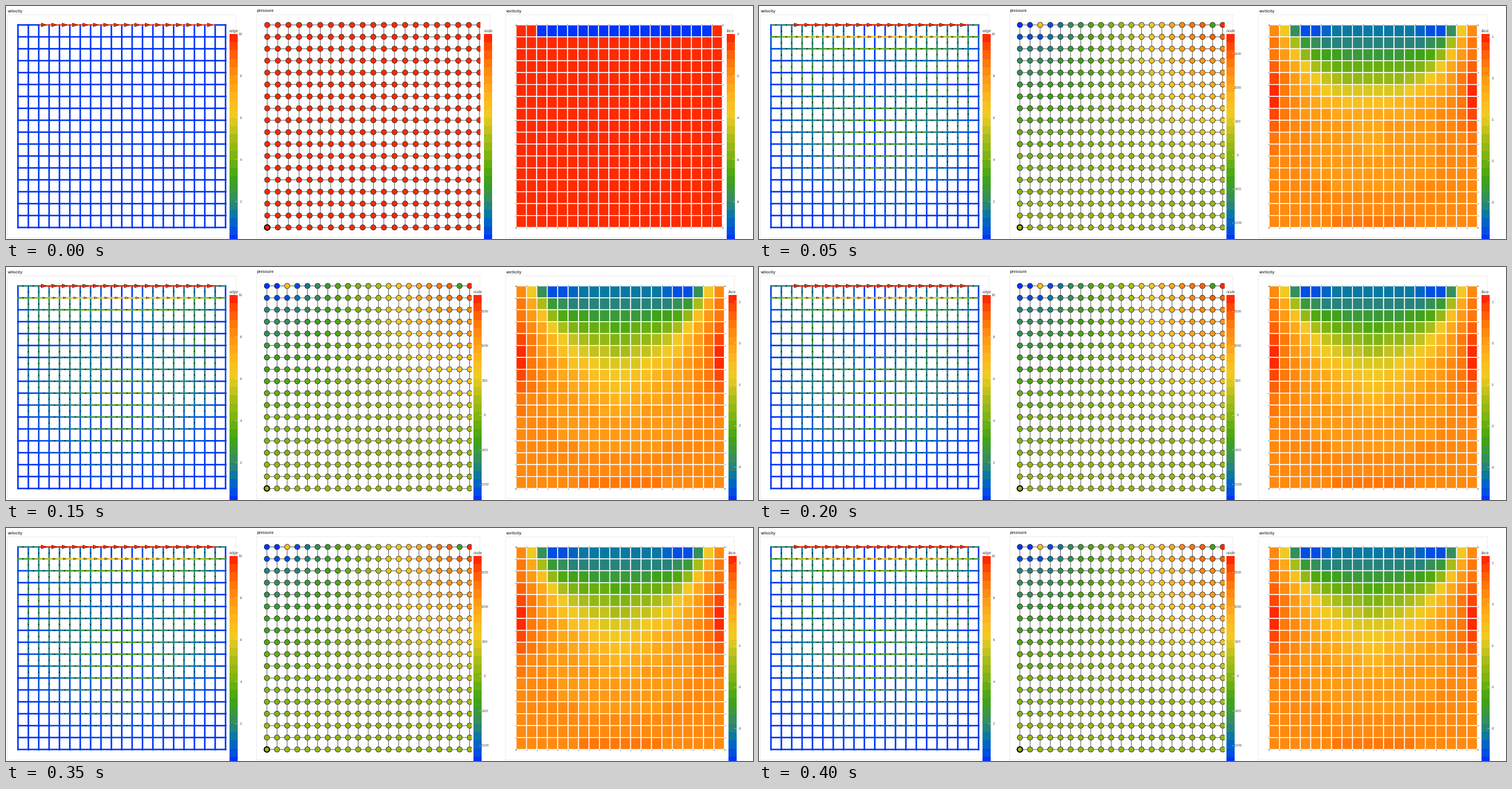
Animation of 1280 by 400 pixels, one loop 8 s. Source, as a matplotlib script:

```python
import numpy as np
import matplotlib.pyplot as plt
from matplotlib.animation import FuncAnimation
from matplotlib.collections import LineCollection, PolyCollection
from matplotlib.colors import LinearSegmentedColormap
from matplotlib.patches import Rectangle

W, H, DPI = 1280, 400, 100
PX = 72 / DPI
NX, NY = 20, 17
BAR_TOP, BAR_H, BAR_W, LEVELS = 48, 360, 13, 25
STEP_MS = [0, 50, 100, 150, 200, 250, 350, 400]
FRAME_MS, LOOP_MS = 50, 8000
LID = slice(2, 19)
ys = np.linspace(32.5, 380.2, NY + 1)

plt.rcParams["path.snap"] = False
plt.rcParams["text.hinting"] = "none"

cmap = LinearSegmentedColormap.from_list("flow", [
    (0.00, "#0034f8"), (0.05, "#0053dd"), (0.09, "#0068c0"),
    (0.13, "#0a7b9c"), (0.18, "#32876f"), (0.25, "#3a9a3a"),
    (0.31, "#43a60f"), (0.42, "#82b413"), (0.50, "#a9bc18"),
    (0.57, "#d6c620"), (0.63, "#f3c922"), (0.70, "#fdb81f"),
    (0.78, "#ff9f17"), (0.86, "#ff800b"), (0.93, "#ff5a02"),
    (1.00, "#ff2a00")], N=LEVELS)


def hill(u, centre, width):
    return np.exp(-((u - centre) / width) ** 2)


def vorticity(step):
    """Colour fraction per face: a layer under the lid that widens and fades."""
    j, i = np.mgrid[:NY, :NX]
    if step == 0:
        v = np.ones((NY, NX))
        v[0, LID] = 0
        return v
    d = np.minimum(i, NX - 1 - i)
    edge = 1 / (1 + np.exp(-2.5 * (d - 1.45 - 0.55 * j) / (1 + 0.5 * j)))
    layer = 0.68 * np.exp(-(j / 6) ** 1.3) * edge
    corners = 0.09 * hill(d, 3, 1.8) * np.exp(-j / 0.6)
    walls = 0.17 * hill(j, 5.2, 4) * np.exp(-d / 1.3)
    floor = 0.06 * hill(j, 16, 1.5) * d / 9
    v = 0.81 - layer - corners + walls + floor
    if step == 1:
        v += 0.1 * hill(j, 6.8, 2.2) * hill(i, 9.7, 5)
    return np.clip(v, 0, 1)


def pressure(step):
    """Colour fraction per node: low upper left, high upper right."""
    j, i = np.mgrid[:NY + 1, :NX + 1]
    if step == 0:
        return np.ones(i.shape)
    side = np.sin(np.pi / 2 * (i / 10 - 1))
    v = 0.455 + np.where(i < 10, 0.28, 0.39) * side * hill(j, 0, 8.3)
    v += hill(j, 0, 1.5) * (0.09 * hill(i, 19, 3) - 0.2 * hill(i, 1, 3))
    v[0, [2, 19, 20]] = 0.67, 0.30, 1  # jumps at the ends of the lid
    return np.clip(v, 0, 1)


def velocity(step):
    """Signed speeds along horizontal and vertical edges of one big vortex."""
    hor, ver = np.zeros((NY + 1, NX)), np.zeros((NY, NX + 1))
    if step:
        t = np.arange(NY + 2) / (NY + 1)
        depth = (4 * t) ** 0.8 * (4 / 3 * (1 - t)) ** 2.4
        across = np.sin(np.pi * (np.arange(NX) + 0.5) / NX)
        power = 1.3 * np.minimum(np.arange(NY + 1) / 4, 1)
        hor = 25 * np.diff(depth)[:, None] * across ** power[:, None]
        ver = 18 * depth[1:-1, None] * np.diff(np.pad(across ** 1.3, 1))
        hor[0] = 1.9
    hor[0, LID] = 10
    return hor, ver


def arrow(x, y, speed, vertical):
    s = (abs(speed) / 10) ** 1.3
    a = max(4.4 * s, 1.1) * np.sign(speed)
    b = max(3.1 * s, 0.9)
    pts = [(-a, -b), (a, 0), (-a, b)]
    return [(x + q, y - p) if vertical else (x + p, y + q) for p, q in pts]


def grid_lines(xs):
    hor = [[(a, y), (b, y)] for y in ys for a, b in zip(xs, xs[1:])]
    ver = [[(x, a), (x, b)] for a, b in zip(ys, ys[1:]) for x in xs]
    return hor, ver


def box(x0, x1, y0, y1):
    return [(x0, y0), (x1, y0), (x1, y1), (x0, y1)]


def label(x, y, s, size, **kw):
    ax.text(x, y, s, fontsize=size * PX, family="Liberation Sans",
            color="#444444", **kw)


def panel(x0, x1, title):
    ax.add_patch(Rectangle((x0, 15), x1 - x0, 383, fill=False,
                           ec="#e9e9e9", lw=0.9 * PX))
    label(x0 + 0.5, 10.4, title, 7, weight="bold")


def colorbar(x, name, ticks=(), zero=0, unit=1):
    """Ticks sit at zero - value * unit; the bar runs off the stage."""
    edges = np.linspace(BAR_TOP, BAR_TOP + BAR_H, LEVELS + 1)
    ax.add_collection(PolyCollection(
        [box(x, x + BAR_W, a, b) for a, b in zip(edges, edges[1:])],
        facecolors=cmap(np.arange(LEVELS)[::-1]),
        edgecolors="none", antialiaseds=False, zorder=5))
    label(x, 44.8, name, 7, style="italic", zorder=6)
    for t in ticks:
        y = zero - t * unit
        ax.plot([x + BAR_W - 3, x + BAR_W], [y, y], color="white",
                lw=0.6 * PX, alpha=0.8, zorder=6)
        label(x + BAR_W + 6, y + 2, str(t), 5.9, ha="center", zorder=4)


def draw_velocity(step):
    panel(2.5, 394, "velocity")
    hor, ver = velocity(step)
    lines_h, lines_v = grid_lines(np.linspace(20.5, 376.2, NX + 1))
    lines = lines_v + lines_h[::-1]
    speeds = np.append(ver.ravel(), hor.ravel()[::-1])
    widths = np.where((step == 0) & (speeds > 9), 1.9, 2.6)
    ax.add_collection(LineCollection(
        lines, colors=cmap(np.abs(speeds) / 10), linewidths=widths * PX,
        capstyle="projecting", zorder=2))
    moving = np.flatnonzero(np.abs(speeds) > 0.8)
    mids = np.mean(lines, axis=1)
    ax.add_collection(PolyCollection(
        [arrow(*mids[k], speeds[k], k < ver.size) for k in moving],
        facecolors=cmap(np.abs(speeds[moving]) / 10), edgecolors="#222222",
        linewidths=0.7 * PX, zorder=3))
    colorbar(383.2, "edge", range(2, 11, 2), 408, 36)


def draw_pressure(step):
    first = step == 0
    x0, x1, right = (447.6, 811.2, 813) if first else (447, 794.6, 797.5)
    panel(429.5, 829.5 if first else 812, "pressure")
    xs = np.linspace(x0, x1, NX + 1)
    lines_h, lines_v = grid_lines(xs)
    net = LineCollection(lines_h + lines_v, colors="#333333",
                         linewidths=0.8 * PX, zorder=2)
    ax.add_collection(net)
    gx, gy = np.meshgrid(xs, ys)
    size = (9.1 * PX) ** 2
    dots = ax.scatter(gx.ravel(), gy.ravel(), s=size,
                      c=cmap(pressure(step).ravel()),
                      edgecolors="#222222", linewidths=0.8 * PX, zorder=3)
    clip = Rectangle((430, 15), right - 430, 383, transform=ax.transData)
    for art in (net, dots):
        art.set_clip_path(clip)
    ax.scatter([x0], [ys[-1]], s=size, c="none", edgecolors="black",
               linewidths=1.9 * PX, zorder=4)
    if first:
        colorbar(819.2, "node")
    else:
        zero, unit = (256, 0.1163) if step == 1 else (254.4, 0.119)
        colorbar(801.2, "node", range(-1000, 1501, 500), zero, unit)


def draw_vorticity(step):
    first = step == 0
    panel(856, 1245 if first else 1248, "vorticity")
    xs = np.linspace(874, 1227.5 if first else 1231, NX + 1)
    cells = [box(x0, x1, y0, y1) for y0, y1 in zip(ys, ys[1:])
             for x0, x1 in zip(xs, xs[1:])]
    ax.add_collection(PolyCollection(
        cells, facecolors=cmap(vorticity(step).ravel()), edgecolors="white",
        linewidths=1.5 * PX, zorder=2))
    rim = [(x, y) for x in xs for y in (ys[0] - .6, ys[-1] + .6)]
    rim += [(x, y) for y in ys for x in (xs[0] - .6, xs[-1] + .6)]
    ax.scatter(*zip(*rim), s=(1.3 * PX) ** 2, c="#333333",
               linewidths=0, zorder=3)
    if first:
        colorbar(1235.2, "face", range(-8, 1, 2), 48, 36)
    else:
        # the scale settles as the flow becomes steady
        colorbar(1238.2, "face", range(-3, 2), 131.5 - 7.5 / step ** 2, 70.9)


fig = plt.figure(figsize=(W / DPI, H / DPI), dpi=DPI, facecolor="white")
ax = fig.add_axes([0, 0, 1, 1])
shown = {"step": None}


def update(n):
    step = sum(n * FRAME_MS >= t for t in STEP_MS) - 1
    if step == shown["step"]:
        return []
    shown["step"] = step
    ax.clear()
    ax.axis("off")
    draw_velocity(step)
    draw_pressure(step)
    draw_vorticity(step)
    ax.set_xlim(0, W)
    ax.set_ylim(H, 0)
    return []


def reset():
    shown["step"] = None
    return update(0)


anim = FuncAnimation(fig, update, frames=LOOP_MS // FRAME_MS, init_func=reset,
                     interval=FRAME_MS, repeat=True, repeat_delay=0, blit=False)
plt.show()
```
